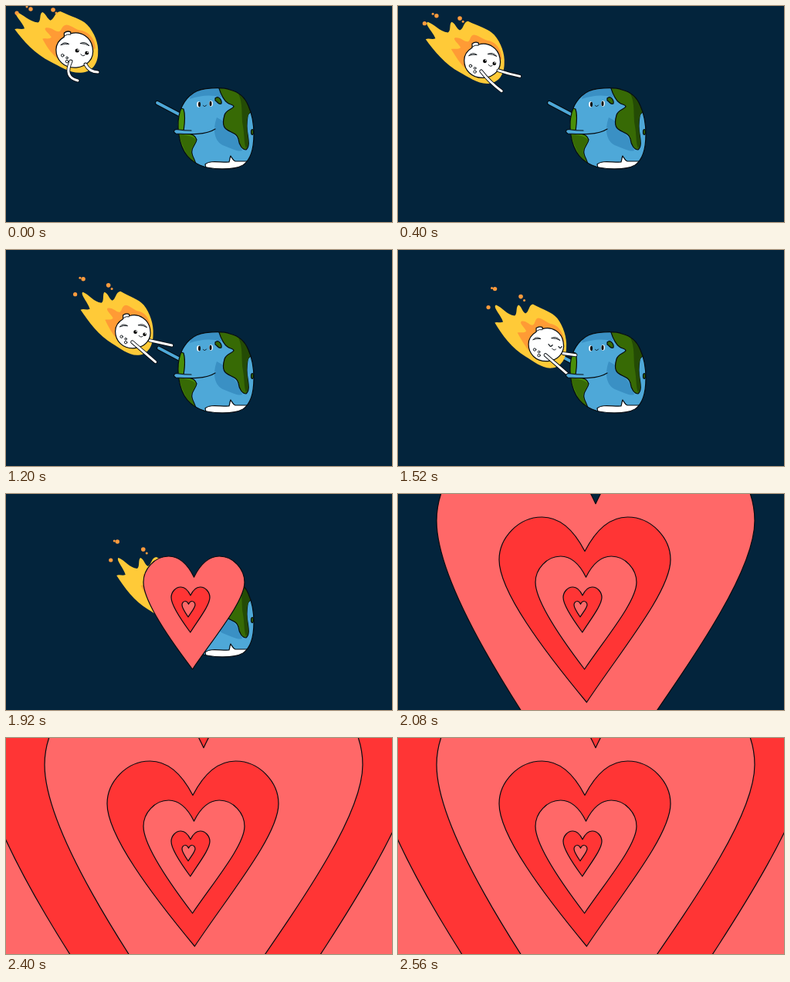
An HTML page that plays this animation: 500 by 281 pixels, repeating every 2.6 s.

```html
<!DOCTYPE html>
<html lang="en">
<head>
<meta charset="utf-8">
<title>Moon hug</title>
<style>
html, body { margin: 0; width: 100%; height: 100%; overflow: hidden; background: #03243c; }
svg { display: block; width: 100vw; height: 100vh; }
.ink { stroke: #050b10; stroke-width: 1.2; stroke-linejoin: round; stroke-linecap: round; }
.thin { stroke-width: .9; }
.line { fill: none; }
.blue { fill: #4ea8d8; }
.shade { fill: #3a90c4; }
.green { fill: #376a05; }
.bright { fill: #4a8f08; }
.dark { fill: #244b05; }
.arm { fill: none; stroke-linecap: round; }
</style>
</head>
<body>
<svg viewBox="0 0 500 281" preserveAspectRatio="none">
  <defs>
    <path id="globe" d="M223 158C222 136 231 121 243 113C253 106 280 105 290 109C303 112 310 120 314 130C319 141 321 153 321 167C321 187 317 200 307 207C295 214 264 213 251 207C232 199 224 180 223 158Z"/>
    <clipPath id="inGlobe"><use href="#globe"/></clipPath>
  </defs>
  <rect width="500" height="281" fill="#03243c"/>

  <path class="arm" id="armBack" stroke="#050b10" stroke-width="6"/>
  <path class="arm" id="armFront" stroke="#4ea8d8" stroke-width="3.8"/>

  <use href="#globe" class="blue"/>
  <g clip-path="url(#inGlobe)">
    <path class="shade" d="M240 112L276 105L279 119C266 115 253 116 238 121Z"/>
    <path class="shade" d="M273 145C267 162 270 177 283 182C294 186 300 190 306 188L302 176L282 150Z"/>
    <path class="ink bright" d="M223 132L230 134C233 143 231 156 230 163C236 167 245 166 247 174C246 181 239 184 241 192C242 198 246 201 247 210L215 200Z"/>
    <path class="green" d="M223 163C231 170 240 167 246 174C245 181 238 184 240 192C241 198 245 201 246 208C235 199 227 180 223 163Z"/>
    <path class="ink green" d="M275 104C277 111 281 122 287 126C291 129 295 128 295 131C292 135 285 135 283 142C281 149 280 156 285 160C291 165 299 165 301 173C302 181 306 187 311 187C316 183 314 174 313 167C311 158 312 150 313 143C314 138 318 138 322 136L310 104Z"/>
    <path class="dark" d="M300 112C308 126 304 143 307 157C309 168 308 178 311 185C316 181 313 168 312 158C312 148 313 138 319 136L308 113Z"/>
    <ellipse class="ink green" cx="319" cy="164" rx="1.5" ry="3.5"/>
    <path class="ink green" d="M271 120C275 116 280 122 279 127C275 129 274 124 271 123Z"/>
    <path class="ink" fill="#fff" d="M258 206C264 200 279 204 289 203C290 200 290 197 291 195C293 198 294 201 297 202L314 202L306 216H260Z"/>
  </g>
  <use href="#globe" class="ink line"/>
  <ellipse cx="249.500" cy="128" rx="2.4" ry="3.7" fill="#fff"/>
  <ellipse cx="265.500" cy="127" rx="2.4" ry="3.7" fill="#fff"/>
  <ellipse cx="250.500" cy="128" rx="1.5" ry="3.3"/>
  <ellipse cx="265" cy="127" rx="1.5" ry="3.3"/>
  <path class="ink line thin" d="M255.500 129.500Q257.500 132 259.500 129"/>

  <g id="moon">
    <path id="flame" fill="#ffca38"/>
    <path id="core" fill="#ff9b35"/>
    <g id="sparks" fill="#ff9b3d"></g>
    <g id="ball">
      <path class="ink" fill="#fff" d="M-13 -17L-13 -22Q-9 -25 -5 -23L-5 -21C8 -25 20 -16 22 -4C25 11 14 20 2 21C-14 22 -23 11 -23 -1C-23 -9 -18 -14 -13 -17Z"/>
      <path class="ink line thin" d="M-13 -18Q-9 -21 -5 -20"/>
      <g fill="#fff">
        <path class="ink thin" d="M-17 -7Q-13 -12 -7 -8Q-12 -9 -17 -7ZM7 -9Q13 -12 18 -6Q13 -9 7 -9Z"/>
        <circle class="ink thin" cx="-15" cy="6" r="1.7"/>
        <circle class="ink thin" cx="-9.500" cy="9" r="1.3"/>
        <circle class="ink thin" cx="-9.500" cy="13.500" r="1.7"/>
      </g>
      <g id="open">
        <circle cx="3" cy="0" r="2.4"/><circle cx="15" cy="3" r="2.3"/>
        <circle cx="4" cy="-.8" r=".8" fill="#fff"/><circle cx="15.800" cy="2.200" r=".8" fill="#fff"/>
      </g>
      <path id="shut" class="ink line" d="M3 -1Q5.500 4 8 0M16 2Q18 6 20 2"/>
      <path class="ink line thin" d="M7.500 4.500Q10 8 12.500 5.500"/>
    </g>
    <g id="limbs"></g>
  </g>

  <path class="blue" d="M220 160.500C233 162 252 163 262 160L272 158L268 163C255 168 235 167 220 166Q215 163 220 160.500Z"/>
  <path class="ink line" d="M240 162C229 162 224 161 220 160.500Q215 163 220 166C238 167 259 168 271 160"/>
  <g id="hearts" class="ink"></g>
</svg>
<script>
const LOOP = 2600, STEP = 40, HUG_AT = 1160, HEARTS_AT = 1760, BEAT = 80;
const $ = id => document.getElementById(id);
const set = (el, attrs) => { for (const k in attrs) el.setAttribute(k, attrs[k]); };
const clamp = v => Math.max(0, Math.min(1, v));
const mix = (a, b, p) => a.map((v, i) => v + (b[i] - v) * p);

function add(parent, tag, attrs) {
  const el = document.createElementNS("http://www.w3.org/2000/svg", tag);
  set(el, attrs);
  return parent.appendChild(el);
}

const sparks = [
  { x: -75, y: -49, r: 2.6, rise: 0 },
  { x: -57, y: -54, r: 2.7, rise: 19 },
  { x: -62, y: -57, r: 1.5, rise: 17 },
  { x: -28, y: -53, r: 2.8, rise: 10 },
  { x: -24, y: -49, r: 1.5, rise: 9 }
];
for (const s of sparks) s.el = add($("sparks"), "circle", { r: s.r });

// Shoulder and hand, from hanging to stretched out
const limbs = [
  { rest: [-5, 14, 4, 39], reach: [-1, 13, 29, 39], bend: [-14, 8], hug: 0 },
  { rest: [14, 18, 30, 28], reach: [22, 11, 52, 18], bend: [-3, 5], hug: 14 }
];
for (const limb of limbs) {
  limb.paths = [["#050b10", 4.8], ["#fff", 3]].map(([stroke, width]) =>
    add($("limbs"), "path", { class: "arm", stroke, "stroke-width": width }));
}

// Heart sizes from birth to full screen; the tip drifts right as they grow
const sizes = [
  { cx: 236.5, top: 139.5, w: 17, h: 20.5 },
  { cx: 239, top: 121, w: 50, h: 59 },
  { cx: 243.5, top: 81, w: 131, h: 147 },
  { cx: 242, top: 30, w: 222, h: 241 },
  { cx: 256, top: -78, w: 412, h: 490 },
  { cx: 250, top: -156, w: 576, h: 677 },
  { cx: 250, top: -900, w: 2000, h: 2400 }
];

function heart({ cx, top, w, h }, level) {
  const cleft = top + h * .185, side = top + h * .23, fall = h * .77;
  const tx = 236 + 2.8 * level, ty = top + h;
  const half = (dir, taper) => {
    const edge = cx + dir * w / 2, peak = cx + dir * w / 4;
    return [[cx, cleft], [cx + dir * w * .05, cleft - h * .09], [peak - dir * w * .125, top], [peak, top],
      [peak + dir * w * .14, top], [edge, top + h * .115], [edge, side],
      [edge, side + fall * .22], [tx + (edge - tx) * taper, ty - fall * .37], [tx, ty]];
  };
  const left = half(-1, .5), right = half(1, .42).reverse();
  return `M${left[0]}C${left.slice(1).join(" ")}C${right.slice(1).join(" ")}Z`;
}
const hearts = sizes.map((size, level) => ({ level, d: heart(size, level) })).reverse();
for (const item of hearts) item.el = add($("hearts"), "path", { d: item.d });

function drawFlame(t, far) {
  const f = Math.sin(t / 70), g = Math.cos(t / 90);
  const transform = `scale(${1 + .16 * far} ${1 - .04 * far})`;
  set($("flame"), { transform, d: `M${-67 + f} -29C-64 -31 -60 -28 -56 -30C-58 -38 ${-70 + g} -50 -65 -52
    C-57 -49 -51 -39 -41 -38C-37 -40 -40 -50 ${-36 + f} -52C-32 -50 -31 -43 -27 -41
    C-22 -43 -23 -52 ${-17 + g} -53C-4 -46 7 -43 14 -35C22 -25 27 -9 26 3
    C26 17 20 29 7 30C-5 31 -17 21 -27 15C-44 5 -58 -14 ${-67 + f} -29Z` });
  set($("core"), { transform, d: `M${-37 + g} -16C-32 -17 -29 -15 -26 -18C-28 -23 -36 -29 ${-32 + f} -31
    C-25 -32 -22 -25 -17 -26C-14 -28 -15 -34 ${-10 + g} -35C-3 -34 1 -28 8 -27
    C18 -24 23 -13 23 -3L0 20C-20 18 -30 -3 ${-37 + g} -16Z` });
}

function drawMoon(t, hug) {
  const x = 89 + .045 * t + 15e-6 * t * t, y = 58 + .031 * t + 8e-6 * t * t;
  const far = clamp(1 - t / 900), reach = clamp(t / 480), drift = clamp(t / 1520);
  set($("moon"), { transform: `translate(${x} ${y})` });
  set($("ball"), { transform: `scale(${1 + .05 * far})` });
  drawFlame(t, far);
  $("open").style.display = hug > .25 ? "none" : "";
  $("shut").style.display = hug > .25 ? "" : "none";

  for (const { x, y, rise, el } of sparks) {
    set(el, { cx: x - rise * drift / 2, cy: y - rise * drift });
  }
  for (const limb of limbs) {
    const [sx, sy, hx, hy] = mix(limb.rest, limb.reach, reach);
    const [bx, by] = mix(limb.bend, [0, 0], reach);
    const end = hx - limb.hug * hug, low = hy - limb.hug * hug * .35;
    const d = `M${sx} ${sy}Q${(sx + end) / 2 + bx} ${(sy + low) / 2 + by} ${end} ${low}`;
    for (const el of limb.paths) set(el, { d });
  }
}

function draw(time) {
  const t = Math.floor(time % LOOP / STEP) * STEP;
  const travel = Math.min(t, HEARTS_AT - STEP), hug = clamp((t - HUG_AT) / 300);
  drawMoon(travel, hug);

  const d = `M${196 + 15 * hug} ${126 + 12 * hug}L228 ${143 + 4 * hug}`;
  set($("armBack"), { d });
  set($("armFront"), { d });

  const beat = Math.floor((t - HEARTS_AT) / BEAT);
  for (const { level, el } of hearts) {
    el.style.display = level <= beat ? "" : "none";
    set(el, { fill: (beat - level) % 2 ? "#ff3535" : "#ff6868" });
  }
}

const start = performance.now();
function tick() {
  draw(performance.now() - start);
  requestAnimationFrame(tick);
}
tick();
</script>
</body>
</html>
```
